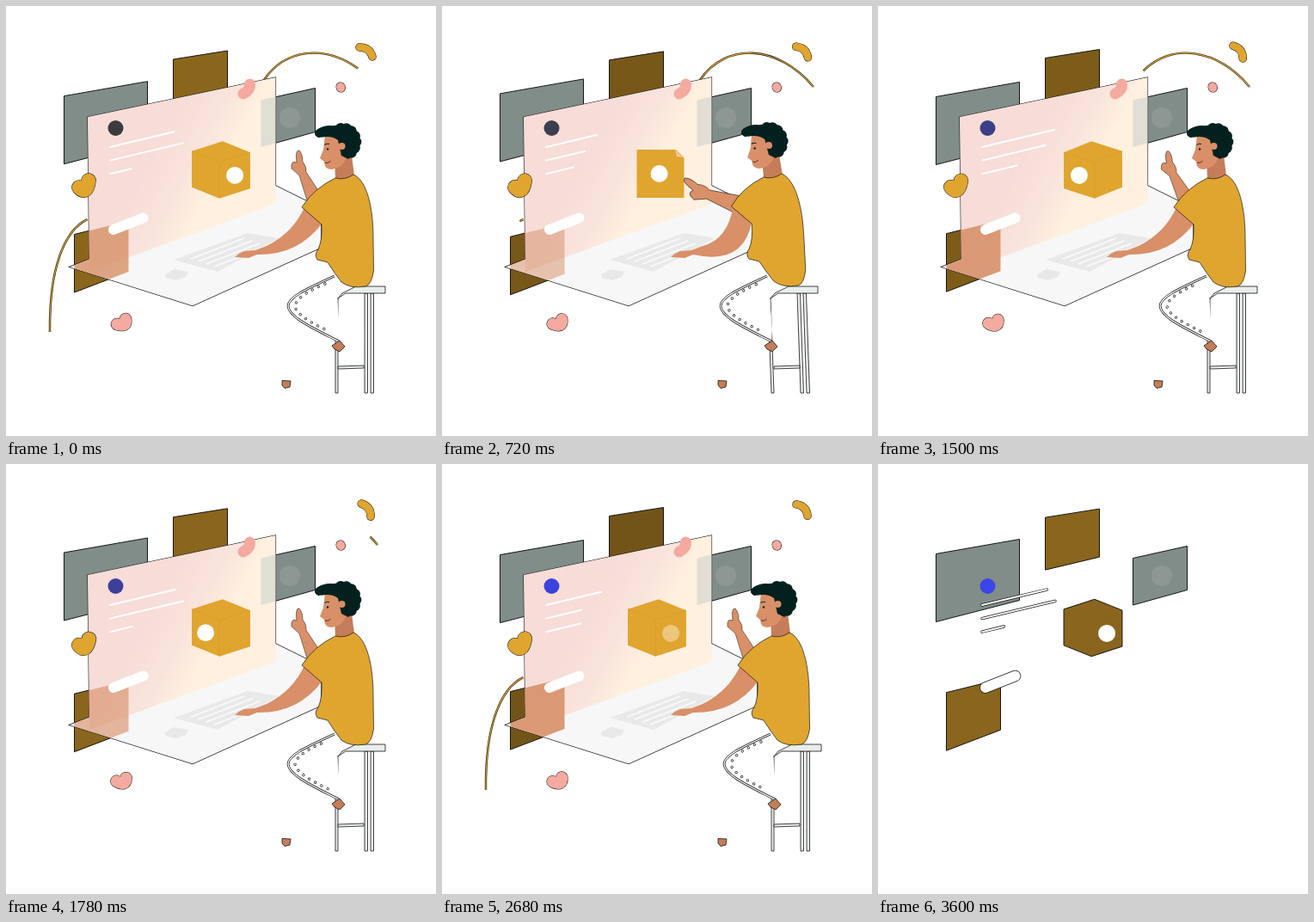
An HTML page with a canvas that plays this animation: 500 by 500 pixels, repeating every 3620 ms.

```html
<!DOCTYPE html>
<html lang="en">
<head>
<meta charset="utf-8">
<title>Designer at a giant laptop</title>
<style>
html, body { margin: 0; width: 100%; height: 100%; overflow: hidden; background: #fff; }
canvas { display: block; width: 500px; height: 500px; }
</style>
</head>
<body>
<canvas id="stage" width="500" height="500"></canvas>
<script>
const LOOP = 3620, LAST = 3600, RAD = Math.PI / 180;
const c = document.getElementById('stage').getContext('2d');
const GOLD = '#e0a52f', SKIN = '#d98f68', SHADE = '#c47d58', PINK = '#f5aaa0';
const HAIR = '#04211f', GREY = '#808d88', INK = '#161616', STOOL = '#e9eeec';

// ---- timing ----
const ramp = (t, from, to) => Math.max(0, Math.min(1, (t - from) / (to - from)));
const soft = (t, from, to) => (1 - Math.cos(Math.PI * ramp(t, from, to))) / 2;
const sharp = (t, from, to) => {
  const p = ramp(t, from, to);
  return p < .5 ? 4 * p ** 3 : 1 - 4 * (1 - p) ** 3;
};
// cosine wave with a whole number of cycles per loop
const wave = (t, cycles, shift) => Math.cos(2 * Math.PI * (t / LOOP * cycles - shift));

// ---- drawing ----
const shape = d => new Path2D(d);
const poly = pts => shape('M' + pts.join('L') + 'Z');

function line(path, color, width) {
  c.strokeStyle = color;
  c.lineWidth = width;
  c.stroke(path);
}
function paint(path, color, edge) {
  c.fillStyle = color;
  c.fill(path);
  if (edge) line(path, INK, edge);
}
function dot(x, y, r, color) {
  c.fillStyle = color;
  c.beginPath();
  c.arc(x, y, r, 0, 7);
  c.fill();
}
function posed(draw, ...matrix) {
  c.save();
  c.transform(...matrix);
  draw();
  c.restore();
}
function turned(x, y, deg, scale, draw) {
  c.save();
  c.translate(x, y);
  c.rotate(deg * RAD);
  c.scale(scale, scale);
  c.translate(-x, -y);
  draw();
  c.restore();
}
// a soft tube: thick stroke with round ends
function tube(d, width, color, edge = 0) {
  const path = shape(d);
  c.lineCap = 'round';
  if (edge) line(path, INK, width + edge);
  line(path, color, width);
  c.lineCap = 'butt';
}

// ---- panels ----
// upright panel in perspective: the right side rises by `up` at the top and `down` at the bottom
const panel = (x, y, w, h, up, down) => poly([[x, y], [x + w, y - up], [x + w, y + h - down], [x, y + h]]);

function panels(t) {
  const a = .56 + .065 * wave(t, 2, .08), drift = wave(t, 3, .17);
  const brown = `rgb(${[224, 165, 47].map(v => Math.round(v * a))})`;
  const low = panel(79.5, 266.5 - 2 * drift, 63, 67.5, 15.5, 24);
  paint(panel(194.5, 62 + 1.5 * wave(t, 3, .75), 63, 61, 10, 15), brown, 1);
  paint(panel(67.5, 103.7 + 2 * drift, 97, 79, 17, 25), GREY, 1);
  paint(low, brown, 1);
  paint(panel(296.5, 109.5, 63, 54.5, 14, 17.5), GREY, 1);
  dot(330, 130, 12, 'rgba(255,255,255,.1)');
  return { brown, low, tint: .74 + .22 * drift };
}

// ---- laptop ----
const screen = shape('M95 129L313.5 83V230L97 309Z');
const base = shape('M74 303.5L313.5 209L366 235V281L217 348.5Z');
const laptop = new Path2D(screen);
laptop.addPath(base);

const glow = c.createLinearGradient(182, 137, 257, 177);
glow.addColorStop(0, '#f7dcd8');
glow.addColorStop(.6, '#f9e4dc');
glow.addColorStop(1, '#fff0df');

function computer(low, tint) {
  line(base, INK, 1.4);
  line(screen, INK, 1.2);
  paint(base, '#f7f7f7');
  paint(screen, glow);
  c.save();
  c.clip(laptop, 'nonzero');
  c.globalAlpha = tint;
  paint(low, '#d9956f');
  c.globalAlpha = .6;
  paint(panel(296.5, 109.5, 17, 54.5, 4, 4.5), '#cbd3cf');
  c.restore();
  paint(shape('M195 295L281 264L317 270L246 309Z'), '#e9e9e9');
  for (let i = 0; i < 4; i++) {
    const x = 215 + i * 9, y = 294 + i * 3;
    line(shape(`M${x} ${y}L${x + 62} ${y - 24}`), '#fbfbfb', 1.6);
  }
  paint(shape('M185 312L196 306L212 309L209 315L198 319L186 316Z'), '#e8e8e8');
}

function content(t, bare) {
  const edge = bare ? 1.4 : 0;
  const bar = (i, end) => {
    const y = 164 + i * 15.6;
    tube(`M121 ${y}L${end - 1} ${y - (end - 121) * .235}`, 2, '#fff', edge);
  };
  bar(0, 192 + 14 * wave(t, 2, .8));
  bar(1, 185 + 22 * wave(t, 2, 0));
  bar(2, 155 + 16 * wave(t, 2, .66));
  c.lineJoin = 'round';
  tube('M125 260L159.5 246.5', 12, '#fff', edge);
  c.lineJoin = 'miter';
  dot(127.5, 142, 9, `rgb(60,${60 + 8 * ramp(t, 500, 2900)},${62 + 174 * ramp(t, 500, 2900)})`);
}

// ---- cube: a turning box that flattens into a sheet and back ----
function cube(t, bare, brown) {
  const turn = 90 * soft(t, 430, 720) / 2 + 45 * soft(t, 1120, 1620);
  const flat = soft(t, 430, 720) * (1 - soft(t, 1120, 1480));
  const x0 = 250 + 4 * flat, y0 = 190.5 + 4.5 * flat;
  const r = 34 + 3 * flat, tilt = .36 * (1 - flat), half = 21 + 7 * flat;
  const at = (deg, dy, k = 1) => [x0 + k * r * Math.cos(deg * RAD), y0 + dy + k * r * tilt * Math.sin(deg * RAD)];
  const near = (48 + turn) % 90 + 45, left = near + 90, right = near - 90;
  const body = poly([at(left, -half), at(near + 180, -half), at(right, -half), at(right, half), at(near, half), at(left, half)]);

  if (bare) paint(body, brown, 1);
  else {
    paint(body, GOLD);
    c.globalAlpha = 1 - flat;
    line(shape(`M${at(left, -half)}L${at(near, -half)}L${at(right, -half)}M${at(near, -half)}L${at(near, half)}`), '#d69e2d', .8);
    c.globalAlpha = flat;
    paint(shape('M270 165H283V178Z'), '#fff0df');
    paint(shape('M271 167L280 176L273 175Z'), '#f2c6a4');
  }
  c.globalAlpha = 1 - soft(t, 2100, 2360) + soft(t, 2560, 2850);
  dot(...at(48 + (t < 2460 ? turn : 0), 0, Math.SQRT1_2), 10, '#fff');
  c.globalAlpha = 1;
}

// ---- arcs and floating shapes ----
const arcTop = shape('M300 86C330 42 390 44 432 94');
const arcLeft = shape('M51 379C50 300 70 258 97 247');

function arc(path, length, from, to) {
  if (to - from < .005) return;
  c.setLineDash([(to - from) * length, length * 2]);
  c.lineDashOffset = -from * length;
  line(path, INK, 2.4);
  line(path, GOLD, 1.2);
  c.setLineDash([]);
}

function arcs(t) {
  const u = t > 3000 ? t - LOOP : t;
  arc(arcTop, 158, sharp(u, 1320, 1970), sharp(u, -372, 228));
  arc(arcLeft, 144, t < 1500 ? sharp(t, 200, 850) : 0, t < 1500 ? 1 : sharp(t, 2060, 2660));
}

function confetti(t) {
  const spin = 9 - 9 * wave(t, 1, 0);
  turned(418, 54, spin, 1, () => tube('M411 48Q423 48 426 59', 8.5, GOLD, 1));
  turned(134, 367, spin * .7, 1, () => tube('M129 370Q141 374 139 364', 13.5, PINK, 1));
  turned(90, 209, spin * .25, 1, () => tube('M85 211Q94 220 96 203', 16.5, GOLD, 1));
  tube('M389 94L389.5 95', 10, PINK, 1);
  tube('M283.5 91Q284 98 276 102', 13, PINK);
}

// ---- person ----
const shirt = shape('M383 200Q394 203 404 196C420 203 427 235 427 270L427.5 308Q425 324 418 326Q400 329 390 321Q382 311 374 298L362 295Q358 289 363 283Q368 272 367 254L344 234Q358 212 383 200Z');
const pointer = shape('M368 222L349 193Q350 187 345 181Q345 172 341 168Q336 167 338 182Q331 179 332 189L341 197L350 226Z');
const face = shape('M371 150L392 150L396 176Q392 188 379 190Q370 190 370 181L365 177L369 167Z');

function stool(lean) {
  const s = -4 * lean;
  const leg = (x, y, w) => paint(poly([[x + s, y], [x + w + s, y], [x + w, 450], [x, 450]]), STOOL, .8);
  leg(417, 334, 3.5);
  leg(424, 334, 3.5);
  leg(383, 340, 3);
  paint(shape('M386 419L416 418V421L386 422Z'), STOOL, .8);
  posed(() => paint(shape('M386 340L391 334L407 326H441V334H395Z'), STOOL, .8), 1, 0, 0, 1, s, 0);
}

function legs() {
  const thigh = 'M382 314C352 328 328 338 328 349C329 362 356 374 387 390';
  paint(shape(thigh + 'L388 376L384 325Z'), '#fff');
  line(shape(thigh), INK, 2.8);
  line(shape(thigh), '#fff', 1.3);
  c.setLineDash([.1, 8]);
  tube('M371 323C352 331 337 340 336 349C337 359 358 370 377 379', 1.8, '#fff', 1.4);
  c.setLineDash([]);
  paint(shape('M379 395L388 389L394 396L388 402L382 399Z'), SHADE, .8);
}

function head() {
  paint(shape('M382 180L402 174L405 197Q394 205 383 201Z'), SHADE);
  paint(face, SKIN);
  paint(shape('M376 142L400 142L408 170L398 178L390 174L386 156Q378 150 366 153Z'), HAIR);
  tube('M364 148Q374 141 388 146', 10, HAIR);
  for (let i = 0; i < 8; i++) {
    const a = -2.2 + i * .44;
    dot(392 + 15 * Math.cos(a), 158 + 16 * Math.sin(a), 6.3, HAIR);
  }
  dot(390.5, 163, 4, SKIN);
  dot(374, 166.5, 1.2, HAIR);
  line(shape('M370.5 161.5Q373 159.5 376 160.5'), HAIR, 1);
  line(shape('M371 182Q375 183.5 377.5 180'), '#5d2f22', 1);
}

// the hand stays on the keys while the shoulder follows the body
function restingArm(l) {
  paint(shape(`M${348 - 9 * l} 232Q${334 - 2 * l} ${264 + 8 * l} 303 279L290 284L277 285Q271 287 266 292L282 293L292 289Q${340 + 10 * l} ${290 + 12 * l} ${368 - 8 * l} 252Z`), SKIN);
}

function person(t) {
  const lean = soft(t, 0, 420) * (1 - soft(t, 850, 1480));
  const reach = soft(t, 0, 600) * (1 - soft(t, 1040, 1580));
  const upper = [1, 0, .04 * lean, 1, -17 * lean, -lean];
  stool(lean);
  posed(legs, 1, 0, 0, 1, -4 * lean, 0);
  paint(shape('M321 435.5L331 436L330 443L324 444.5L321 441Z'), SHADE, .8);
  posed(() => turned(358, 224, -46 * reach, 1 + .2 * reach, () => paint(pointer, SKIN, .5)),
    1, 0, 0, 1, -13 * reach, 8 * reach);
  posed(head, ...upper);
  restingArm(lean);
  posed(() => paint(shirt, GOLD, .7), ...upper);
}

function draw(t) {
  const bare = t >= LAST;
  c.fillStyle = '#fff';
  c.fillRect(0, 0, 500, 500);
  if (!bare) arcs(t);
  const { brown, low, tint } = panels(t);
  if (!bare) {
    computer(low, tint);
    confetti(t);
  }
  content(t, bare);
  cube(t, bare, brown);
  if (!bare) person(t);
}

const start = performance.now();
function tick() {
  draw((performance.now() - start) % LOOP);
  requestAnimationFrame(tick);
}
tick();
</script>
</body>
</html>
```
